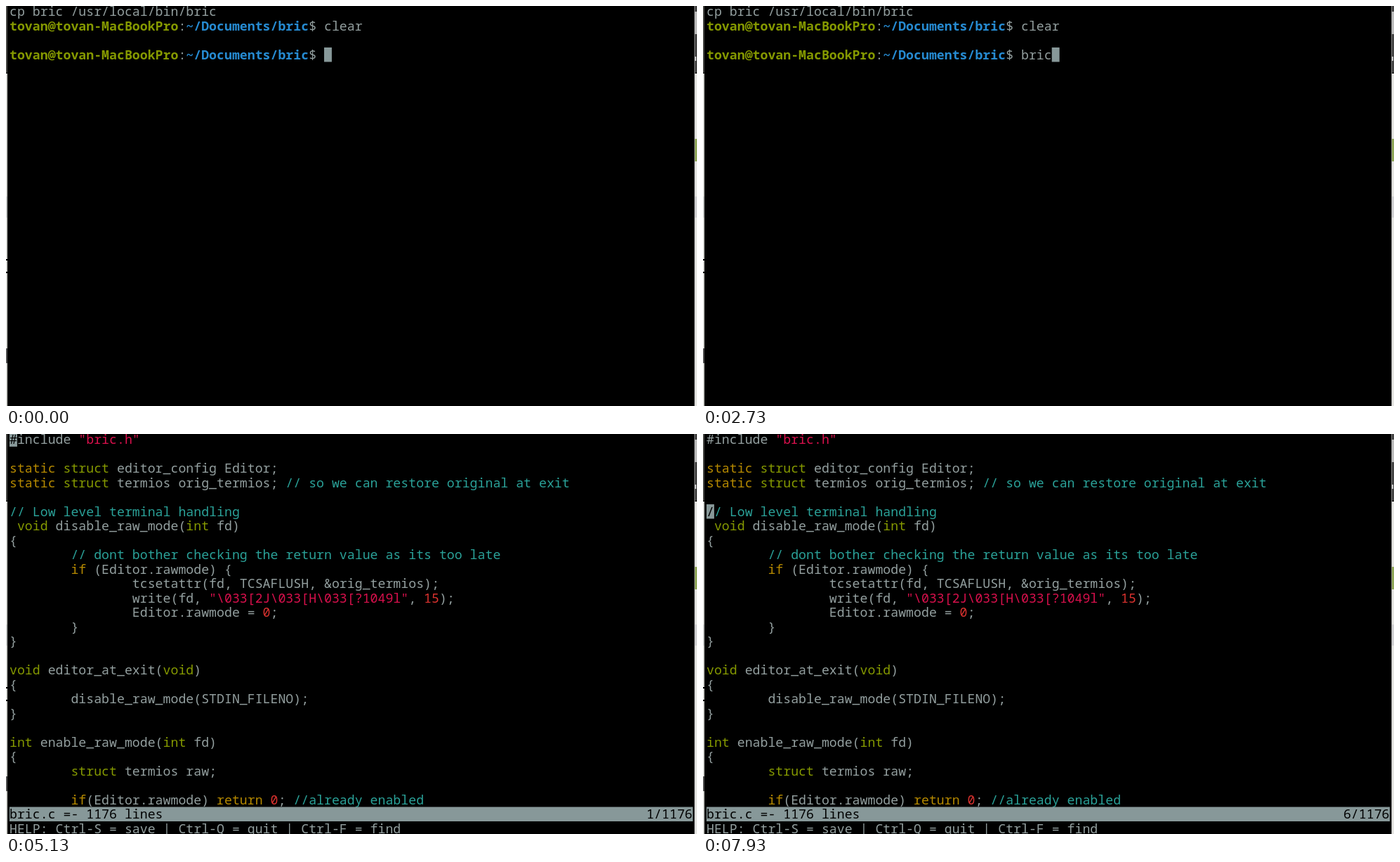
Write an HTML page with a canvas that moves like this. It is 984 px wide and 569 px high and loops after 8 s.

```html
<!DOCTYPE html>
<html lang="en">
<head>
<meta charset="utf-8">
<title>Terminal editor</title>
<style>
  html, body { margin: 0; width: 100%; height: 100%; overflow: hidden; background: #000; }
  canvas { display: block; }
</style>
</head>
<body>
<canvas id="stage" width="984" height="569"></canvas>
<script>
const ctx = document.getElementById('stage').getContext('2d');
const LOOP = 8000, CELL = 10.927, ROW = 20.5, LEFT = 5, TOP = -2.5, BASE = 16.5;
const FONT = '18.2px "Noto Sans Mono", "DejaVu Sans Mono", monospace';
const C = {
  text: '#939f9f', block: '#879899', green: '#859900', blue: '#268bd2',
  cyan: '#2aa198', yellow: '#b58900', red: '#dc322f', string: '#d8104c'
};

const COMMAND = 'bric bric.c';
const KEYS = [1870, 1930, 2470, 2730, 3200, 3730, 3800, 4000, 4200, 4470, 4670];
const OPEN = 5130;
const MOVES = [6870, 7270, 7530, 7730, 7930];
const BLINKS = [[730, 1270], [5670, 6270]];

// The listing on screen; § stands for the two slashes of a C remark.
const CODE = [
  '#include "bric.h"',
  '',
  'static struct editor_config Editor;',
  'static struct termios orig_termios; § so we can restore original at exit',
  '',
  '§ Low level terminal handling',
  ' void disable_raw_mode(int fd)',
  '{',
  '\t§ dont bother checking the return value as its too late',
  '\tif (Editor.rawmode) {',
  '\t\ttcsetattr(fd, TCSAFLUSH, &orig_termios);',
  '\t\twrite(fd, "\\033[2J\\033[H\\033[?1049l", 15);',
  '\t\tEditor.rawmode = 0;',
  '\t}',
  '}',
  '',
  'void editor_at_exit(void)',
  '{',
  '\tdisable_raw_mode(STDIN_FILENO);',
  '}',
  '',
  'int enable_raw_mode(int fd)',
  '{',
  '\tstruct termios raw;',
  '',
  '\tif(Editor.rawmode) return 0; §already enabled'
].map(line => line.replace('§', '/'.repeat(2)).replaceAll('\t', ' '.repeat(8)));

const TOKENS = /([/]{2}.*)|("[^"]*")|\b(static|if|return)\b|\b(struct|void|int)\b|\b(\d+)\b/g;
const TOKEN_COLORS = [C.cyan, C.string, C.yellow, C.green, C.red];

const rect = (color, x, y, w, h) => { ctx.fillStyle = color; ctx.fillRect(x, y, w, h); };
const passed = (times, t) => times.filter(at => t >= at).length;

// Puts each character in its terminal cell and returns the next column.
function put(str, col, row, color = C.text, bold = false) {
  ctx.font = (bold ? 'bold ' : '') + FONT;
  ctx.fillStyle = color;
  for (const ch of str) ctx.fillText(ch, LEFT + CELL * col++, TOP + ROW * row + BASE);
  return col;
}

function cursor(col, row, under = '') {
  rect(C.block, LEFT + CELL * col, TOP + ROW * row, CELL, ROW);
  put(under, col, row, '#000');
}

function prompt(row, command) {
  let col = put('tovan@tovan-MacBookPro', 0, row, C.green, true);
  col = put(':', col, row);
  col = put('~/Documents/bric', col, row, C.blue, true);
  return put('$ ' + command, col, row);
}

function codeLine(line, row) {
  let end = 0;
  for (const m of line.matchAll(TOKENS)) {
    put(line.slice(end, m.index), end, row);
    end = put(m[0], m.index, row, TOKEN_COLORS[m.slice(1).findIndex(Boolean)]);
  }
  put(line.slice(end), end, row);
}

// Slivers of the desktop on both sides of the terminal.
function desktop() {
  rect('#d4d5d1', 0, 0, 984, 569);
  rect('#4b4b48', 0, 0, 3, 95);
  rect('#c4c6c4', 0, 271, 3, 30);
  rect('#555555', 0, 487, 3, 21);
  rect('#000', 0, 360, 3, 2);
  rect('#000', 0, 378, 3, 2);

  rect('#e6e6e3', 981, 96, 3, 473);
  rect('#444444', 981, 0, 3, 95);
  rect('#bdbdbd', 981, 8, 3, 32);
  rect('#cccccc', 981, 72, 2, 6);
  rect('#8fa758', 981, 189, 3, 32);
  rect('#d2d2d4', 981, 271, 3, 30);
  rect('#000', 0, 95, 984, 1);
  rect('#777777', 980, 0, 1, 569);
  rect('#000', 2, 0, 978, 569);
}

function shell(t, lit) {
  put('cp bric /usr/local/bin/bric', 0, 0);
  prompt(1, 'clear');
  const col = prompt(3, COMMAND.slice(0, passed(KEYS, t)));
  if (lit) cursor(col, 3);
}

function editor(t, lit) {
  const line = passed(MOVES, t);
  CODE.forEach(codeLine);
  rect(C.block, LEFT, TOP + ROW * 26, 973, ROW);
  put('bric.c =- 1176 lines', 0, 26, '#000');
  put(`${line + 1}/1176`, 83, 26, '#000');
  put('HELP: Ctrl-S = save | Ctrl-Q = quit | Ctrl-F = find', 0, 27);
  if (lit) cursor(0, line, CODE[line].slice(0, 1));
}

function frame() {
  const t = performance.now() % LOOP;
  const lit = !BLINKS.some(([off, on]) => t >= off && t < on);
  desktop();
  (t < OPEN ? shell : editor)(t, lit);
  requestAnimationFrame(frame);
}
frame();
</script>
</body>
</html>
```
